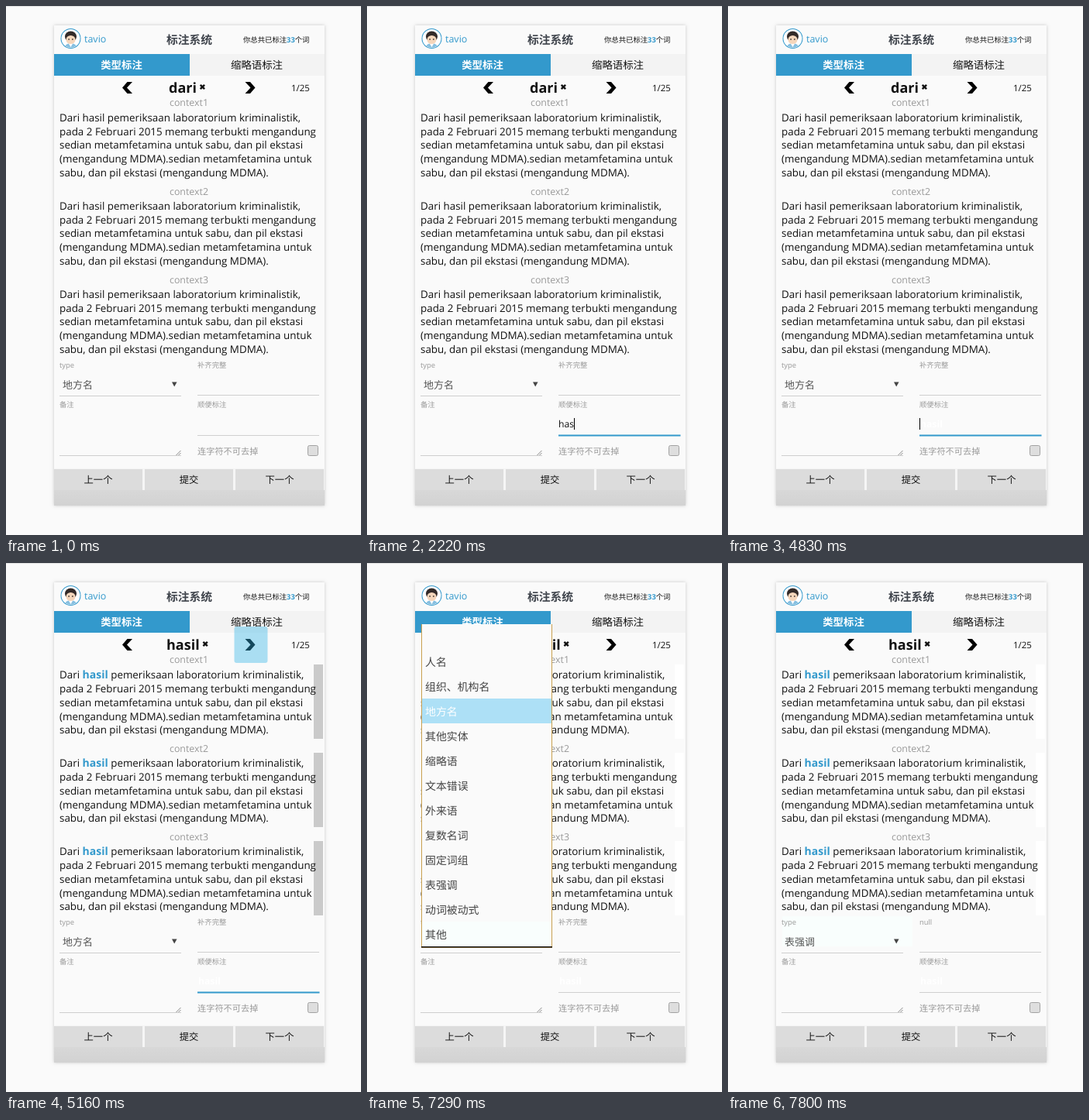
Write an HTML page with a canvas that moves like this. It is 458 by 683 pixels and loops after 8 s.

```html
<!DOCTYPE html>
<html lang="zh">
<head>
<meta charset="utf-8">
<style>
html, body { margin: 0; width: 100%; height: 100%; overflow: hidden; background: #fafafa; }
canvas { display: block; }
</style>
</head>
<body>
<canvas id="stage" width="458" height="683"></canvas>
<script>
const ctx = document.getElementById('stage').getContext('2d');
ctx.textRendering = 'geometricPrecision';
const LOOP = 8000, TICK = 30;
const BLUE = '#3399cc', RULE = '#cfcfcf', PAPER = '#fafafa', MUTED = '#999';
const FONT = '"Open Sans", "Noto Sans CJK SC", "Noto Sans CJK", sans-serif';

const SENTENCE = [
  ' pemeriksaan laboratorium kriminalistik,',
  'pada 2 Februari 2015 memang terbukti mengandung',
  'sedian metamfetamina untuk sabu, dan pil ekstasi',
  '(mengandung MDMA).sedian metamfetamina untuk',
  'sabu, dan pil ekstasi (mengandung MDMA).'
];
const OPTIONS = ['人名', '组织、机构名', '地方名', '其他实体', '缩略语', '文本错误',
  '外来语', '复数名词', '固定词组', '表强调', '动词被动式', '其他'];

// Each entry is [start time, value]; the latest one reached applies.
const TYPED = [[0, ''], [1710, 'h'], [1830, 'ha'], [2220, 'has'], [2340, 'hasi'], [2520, 'hasil'], [2910, '']];
const CARET = [[0, 0], [780, 1], [1230, 0], [1710, 1], [3390, 0], [3900, 1], [4350, 0], [4830, 1], [5160, 0]];
const BAR = [[0, null], [5160, '#cacaca'], [5760, '#e1e1e1'], [5880, '#f6f6f6'], [7290, '#fff']];
const HOVER = [[0, -1], [7290, 2], [7320, 11], [7380, 10], [7530, 9], [7770, -1]];

const at = (track, t) => track.filter(([start]) => start <= t).pop()[1];
const clamp = v => Math.max(0, Math.min(1, v));

function rect(x, y, w, h, fill) {
  ctx.fillStyle = fill;
  ctx.fillRect(x, y, w, h);
}

function shape(points, fill) {
  ctx.fillStyle = fill;
  ctx.beginPath();
  points.forEach(([x, y]) => ctx.lineTo(x, y));
  ctx.fill();
}

// Vertically centred on y; returns the x where the text ends.
function text(str, x, y, size, color = '#111', { bold = false, align = 'left' } = {}) {
  ctx.font = `${bold ? 'bold ' : ''}${size}px ${FONT}`;
  ctx.textAlign = align;
  ctx.fillStyle = color;
  ctx.fillText(str, x, Math.round(y + size * 0.37));
  return x + ctx.measureText(str).width;
}

function faded(alpha, draw) {
  ctx.save();
  ctx.globalAlpha = alpha;
  draw();
  ctx.restore();
}

function disc(x, y, rx, ry, fill) {
  ctx.fillStyle = fill;
  ctx.beginPath();
  ctx.ellipse(x, y, rx, ry, 0, 0, Math.PI * 2);
  ctx.fill();
}

function avatar(x, y) {
  disc(x, y, 13, 13, BLUE);
  disc(x, y, 12, 12, '#fff');
  ctx.save();
  ctx.beginPath();
  ctx.arc(x, y, 11.5, 0, Math.PI * 2);
  ctx.clip();
  disc(x, y + 12, 8, 6, '#86bfe0');
  shape([[x - 3, y + 6], [x + 3, y + 6], [x, y + 11]], '#fff');
  disc(x, y - 2.5, 7.5, 7, '#332b29');
  disc(x, y + 1.5, 6, 5.5, '#f5d6bb');
  disc(x - 2.4, y + 1, 0.8, 0.9, '#332b29');
  disc(x + 2.4, y + 1, 0.8, 0.9, '#332b29');
  ctx.restore();
}

function chevron(x, y, dir) {
  shape([[0, -7.5], [6.5, -7.5], [-0.5, 0], [6.5, 7.5], [0, 7.5], [-6.5, 0]]
    .map(([dx, dy]) => [x + dx * dir, y + dy]), '#000');
}

function panel() {
  rect(0, 0, 458, 683, PAPER);
  rect(0, 0, 458, 1, '#e2e2e2');
  ctx.save();
  ctx.shadowColor = 'rgba(0,0,0,.2)';
  ctx.shadowBlur = 4;
  rect(62, 25, 349, 620, PAPER);
  ctx.restore();

  avatar(83.5, 42);
  text('tavio', 101, 42, 12.5, BLUE);
  text('标注系统', 236.5, 43.5, 14.8, '#3f444c', { bold: true, align: 'center' });
  let x = text('你总共已标注', 306, 44, 9.35);
  x = text('33', x, 44, 9.35, BLUE, { bold: true });
  text('个词', x, 44, 9.35);

  rect(62, 62, 175, 28, BLUE);
  rect(237, 62, 174, 28, '#f3f3f3');
  text('类型标注', 149, 76, 13.4, '#fff', { bold: true, align: 'center' });
  text('缩略语标注', 323.5, 76, 13.4, '#111', { align: 'center' });
}

function wordBar(word) {
  chevron(156.5, 105.5, 1);
  chevron(315, 105.5, -1);
  const end = text(word, word === 'dari' ? 210 : 207, 105, 18, '#111', { bold: true });
  const x = end + 7.5, y = 104.5;
  ctx.strokeStyle = '#111';
  ctx.lineWidth = 2.4;
  ctx.beginPath();
  for (const s of [-1, 1]) {
    ctx.moveTo(x - 2.7, y - 2.7 * s);
    ctx.lineTo(x + 2.7, y + 2.7 * s);
  }
  ctx.stroke();
  text('1/25', 368, 106, 11.5);
}

function context(index, marked, bar) {
  const top = 144 + index * 114;
  text('context' + (index + 1), 236, top - 20 + (index ? 1 : 0), 12.4, MUTED, { align: 'center' });
  if (bar) rect(397, top - 13, 12, 96, bar);
  SENTENCE.forEach((line, i) => {
    let x = 69;
    const y = top + i * 17.7 + (marked && i ? 0.5 : 0);
    if (i === 0) {
      x = text('Dari ', x, y, 13.4);
      x = marked ? text('hasil', x, y, 14, BLUE, { bold: true }) : text('hasil', x, y, 13.4);
    }
    text(line, x, y, 13.4);
  });
}

function form(t, focus) {
  const chosen = t >= 7800;
  if (t >= 7380) rect(70, 456, 168, 39, '#f9fefd');
  text('type', 69, 464, 9.4, MUTED);
  text(chosen ? 'null' : '补齐完整', 247, 464, 9.35, MUTED);
  text('备注', 69, 515, 9.35, MUTED);
  text('顺便标注', 247, 515, 9.35, MUTED);
  text('连字符不可去掉', 247, 575, 11.2, MUTED);
  text(chosen ? '表强调' : '地方名', 73, 489, 13, '#555');
  shape([[214, 485.5], [220.5, 485.5], [217.2, 491.5]], '#444');

  for (const [x, y] of [[69, 503], [247, 502], [69, 580], [247, 554]]) rect(x, y, 157, 1, RULE);
  faded(focus, () => rect(247, 553.5, 157.5, 2, BLUE));

  ctx.strokeStyle = '#888';
  ctx.lineWidth = 1;
  ctx.beginPath();
  for (const d of [6, 3]) {
    ctx.moveTo(225.5 - d, 580);
    ctx.lineTo(225.5, 580 - d);
  }
  ctx.stroke();

  ctx.beginPath();
  ctx.roundRect(389.5, 567.5, 13, 13, 2);
  ctx.fillStyle = '#dedede';
  ctx.fill();
  ctx.strokeStyle = '#a2a2a2';
  ctx.stroke();

  if (t >= 2910) text('hasil', 248, 539.5, 12.2, '#fff', { bold: true });
  const caretX = text(at(TYPED, t), 247, 539.5, 12.2);
  if (at(CARET, t)) rect(Math.round(caretX), 532, 1, 15, '#000');
}

function footer() {
  rect(62, 597, 349, 28, '#f5f5f5');
  ['上一个', '提交', '下一个'].forEach((label, i) => {
    rect(62 + i * 117, 598, 114, 27, '#dcdcdc');
    text(label, 119 + i * 117, 611.5, 12.3, '#111', { align: 'center' });
  });
  const shade = ctx.createLinearGradient(0, 625, 0, 645);
  shade.addColorStop(0, '#d8d8d8');
  shade.addColorStop(1, '#d2d2d2');
  rect(62, 625, 349, 20, shade);
}

function dropdown(hover) {
  rect(70, 79, 169, 418, '#c9a050');
  rect(71, 79, 167, 416, PAPER);
  rect(71, 463, 167, 32, '#f9fefd');
  rect(70, 495, 169, 1.5, '#111');
  OPTIONS.forEach((label, i) => {
    const y = 128 + i * 32;
    if (i === hover) rect(71, y - 17, 167, 32, '#ade0f6');
    text(label, 75, y, 13.9, i === hover ? '#fff' : '#444');
  });
}

function draw(t) {
  const marked = t >= 5160;
  const release = clamp(1 - (t - 5160) / 210);
  const focus = marked ? release : clamp((t - 750) / 240);
  panel();
  wordBar(marked ? 'hasil' : 'dari');
  for (let i = 0; i < 3; i++) context(i, marked, at(BAR, t));
  form(t, focus);
  footer();
  if (marked) faded(release * 0.4, () => {
    ctx.beginPath();
    ctx.roundRect(294.5, 82, 43, 47, 3);
    ctx.fillStyle = '#33b5e5';
    ctx.fill();
  });
  const hover = at(HOVER, t);
  if (hover >= 0) dropdown(hover);
}

const begin = performance.now();
function frame() {
  const t = (performance.now() - begin) % LOOP;
  draw(Math.floor(t / TICK) * TICK);
  requestAnimationFrame(frame);
}
frame();
</script>
</body>
</html>
```
